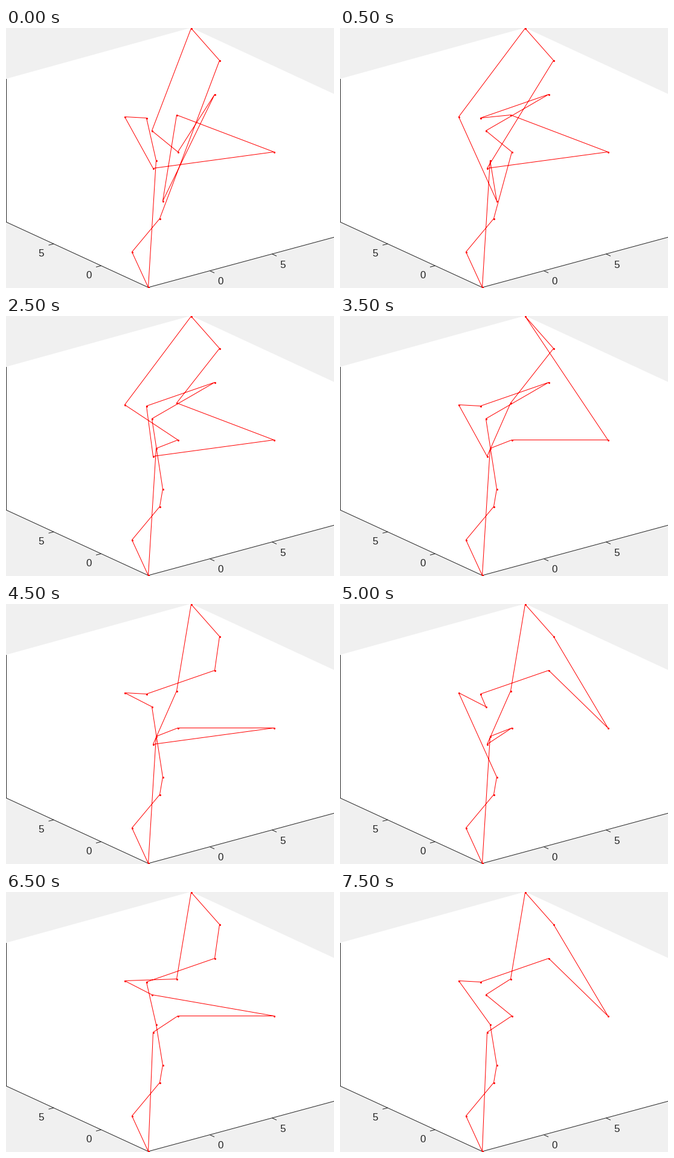
These frames come from a looping animation (543x429 px, 8 s). A matplotlib script:

```python
import matplotlib.pyplot as plt
from matplotlib.animation import FuncAnimation

W, H, DPI = 543, 429, 64
PX = 72 / DPI  # one pixel in points
INK = "#262626"

# Projected city positions, in pixels counted from 1
CITIES = {
    "A": (307, 1), "B": (354, 54), "C": (346, 110), "D": (283, 144),
    "E": (444, 205), "F": (244, 232), "G": (249, 219), "H": (236, 428.5),
    "I": (209, 370), "J": (255, 315), "K": (260, 286), "L": (242, 170),
    "M": (285, 205), "N": (197, 147), "O": (233, 149),
}

# Best closed route found at each step of the search
TOURS = [
    "HGONFEDKCMLABJI",
    "HGKNABFEDOCLMJI",
    "HGMNABFEDOCLKJI",
    "HGMNABEFDOCLKJI",
    "HFMABEGDNOCLKJI",
    "HGMNABDEFOCLKJI",
    "HFEMABDGNOCLKJI",
    "HGMEABDFNOCLKJI",
    "HGMFEBADNOCLKJI",
    "HGMEFDABCONLKJI",
    "HGMFDABECOLNKJI",
    "HEKFGNOCBADLMJI",
    "HEKGNOCBADLMFJI",
    "HFMELNDABCOGKJI",
    "HJKGNOCEBADLMFJI",
    "HFMLDABECONGKJI",
]

fig = plt.figure(figsize=(W / DPI, H / DPI), dpi=DPI, facecolor="#f0f0f0")
ax = fig.add_axes([0, 0, 1, 1])
ax.set(xlim=(0.5, W + 0.5), ylim=(H + 0.5, 0.5))
ax.axis("off")


def stroke(*pts):
    ax.plot(*zip(*pts), color=INK, lw=PX, solid_capstyle="butt")


def tick(x, y, dx, dy, label, lx, ly):
    stroke((x, y), (x + dx, y + dy))
    ax.text(lx, ly, label, color=INK, size=17 * PX, family="Liberation Sans",
            ha="center", va="center")


# Back walls and floor of the 3-D box, then its visible axes
corner = CITIES["H"]
ax.fill(*zip((0, 84.5), (307, 0), (544, 109.5), (544, 346), corner, (0, 320.5)),
        color="white", lw=0)
stroke((1, 84.5), (1, 320.7), corner, (544, 345.6))

tick(79.5, 356.7, -8.5, 2.1, "5", 59, 373)
tick(158, 392.8, -8.5, 2.1, "0", 138, 409)
tick(338, 401.1, 7.5, 3.5, "0", 356, 419)
tick(441, 373.3, 7.5, 3.5, "5", 459, 392)

route, = ax.plot([], [], color="red", lw=PX, marker="o", ms=3 * PX, mew=0,
                 solid_joinstyle="round")


def draw(i):
    tour = TOURS[i]
    route.set_data(*zip(*(CITIES[c] for c in tour + tour[0])))
    return route,


anim = FuncAnimation(fig, draw, frames=len(TOURS), interval=500,
                     repeat=True, repeat_delay=0)
plt.show()
```
